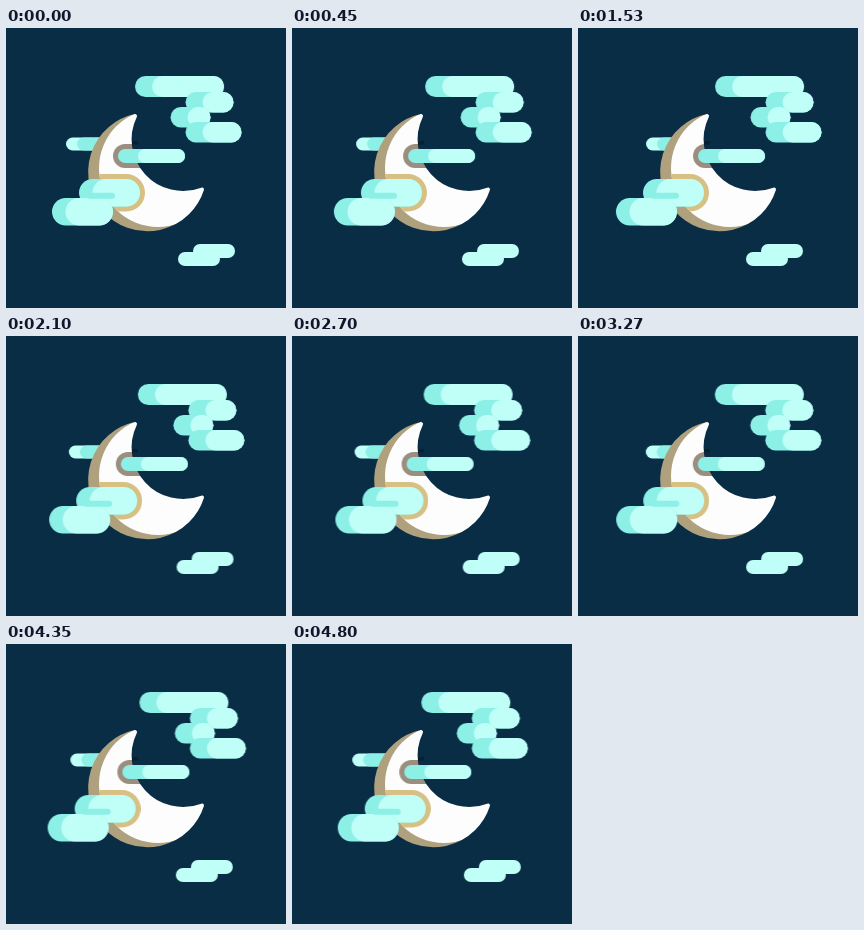
Write an HTML page that moves like this. It is 280x280 px and loops after 4.83 s.

```html
<!DOCTYPE html>
<html lang="en">
<head>
<meta charset="utf-8">
<title>Moon and drifting clouds</title>
<style>
  html, body { margin: 0; width: 100%; height: 100%; overflow: hidden; background: #0a2d46; }
  svg { display: block; width: 100vw; height: 100vh; }
</style>
</head>
<body>
<svg viewBox="0 0 280 280">
  <defs>
    <mask id="moon" maskUnits="userSpaceOnUse" x="0" y="0" width="280" height="280">
      <path d="M129 88A57.3 57.3 0 1 0 196 161.5A53.5 53.5 0 0 1 129 88Z"
            fill="#fff" stroke="#fff" stroke-width="4" stroke-linejoin="round"/>
    </mask>
    <clipPath id="lit"><circle cx="152" cy="140" r="59"/></clipPath>
  </defs>
  <g id="behind"></g>
  <rect x="126" y="113" width="6" height="3.5" fill="#09202f"/>
  <g mask="url(#moon)">
    <rect width="280" height="280" fill="#afa17d"/>
    <circle cx="152" cy="140" r="59" fill="#fdfdfd"/>
    <g id="shadows" clip-path="url(#lit)"></g>
  </g>
  <g id="ahead"></g>
</svg>
<script>
  const SHADE = "#8cf0e7", LIGHT = "#c0fff7";
  const REACH = 11, HALF = 1207.5, HALO = 5;
  const [behind, shadows, ahead] =
    ["behind", "shadows", "ahead"].map(id => document.getElementById(id));

  function add(parent, tag, attrs = {}) {
    const el = document.createElementNS("http://www.w3.org/2000/svg", tag);
    for (const key in attrs) el.setAttribute(key, attrs[key]);
    return parent.appendChild(el);
  }

  function pill(parent, x, y, width, height, fill) {
    add(parent, "rect", { x, y, width, height, rx: height / 2, fill });
  }

  // A group that sways by dx and back at constant speed
  function drift(parent, dx) {
    const group = add(parent, "g");
    group.animate(
      { transform: ["translateX(0)", `translateX(${dx}px)`] },
      { duration: HALF, iterations: Infinity, direction: "alternate" }
    );
    return group;
  }

  // A pill whose left end, `end` wide, has another tone
  function puff(parent, x, y, w, h, end, under = SHADE, over = LIGHT) {
    pill(parent, x, y, w, h, under);
    pill(parent, x + end, y, w - end, h, over);
  }

  // The shadow a pill casts on the moon: the same pill, grown all round
  function shadow(dx, x, y, w, h, fill) {
    pill(drift(shadows, dx), x - HALO, y - HALO, w + 2 * HALO, h + 2 * HALO, fill);
  }

  puff(drift(behind, REACH), 60, 109.5, 52, 13, 11, LIGHT, SHADE);

  const front = [73, 151, 61, 27.5], middle = [112, 121, 67, 14];
  shadow(-REACH, ...front, "#d6c083");
  shadow(REACH, ...middle, "#9b8e7f");
  puff(drift(ahead, REACH), ...middle, 20);

  const [fx, fy, fw, fh] = front;
  const near = drift(ahead, -REACH);
  for (let i = 0; i < 2; i++) puff(near, fx - 27 * i, fy + 19 * i, fw, fh, 13.5);
  pill(near, fx + 7, fy + fh / 2, 29, 6, SHADE);

  // One long pill with a zigzag of three below it
  const high = drift(ahead, REACH);
  puff(high, 129, 48, 89, 21, 17);
  for (let i = 0; i < 3; i++) {
    const odd = i % 2;
    puff(high, 179.5 - 15 * odd, 64 + 15 * i, 48 + 4 * i - 12 * odd, 20.5, 17);
  }

  const low = drift(ahead, -REACH / 2);
  for (let i = 0; i < 2; i++) pill(low, 187 - 15 * i, 216 + 8 * i, 42, 14, LIGHT);
</script>
</body>
</html>
```
